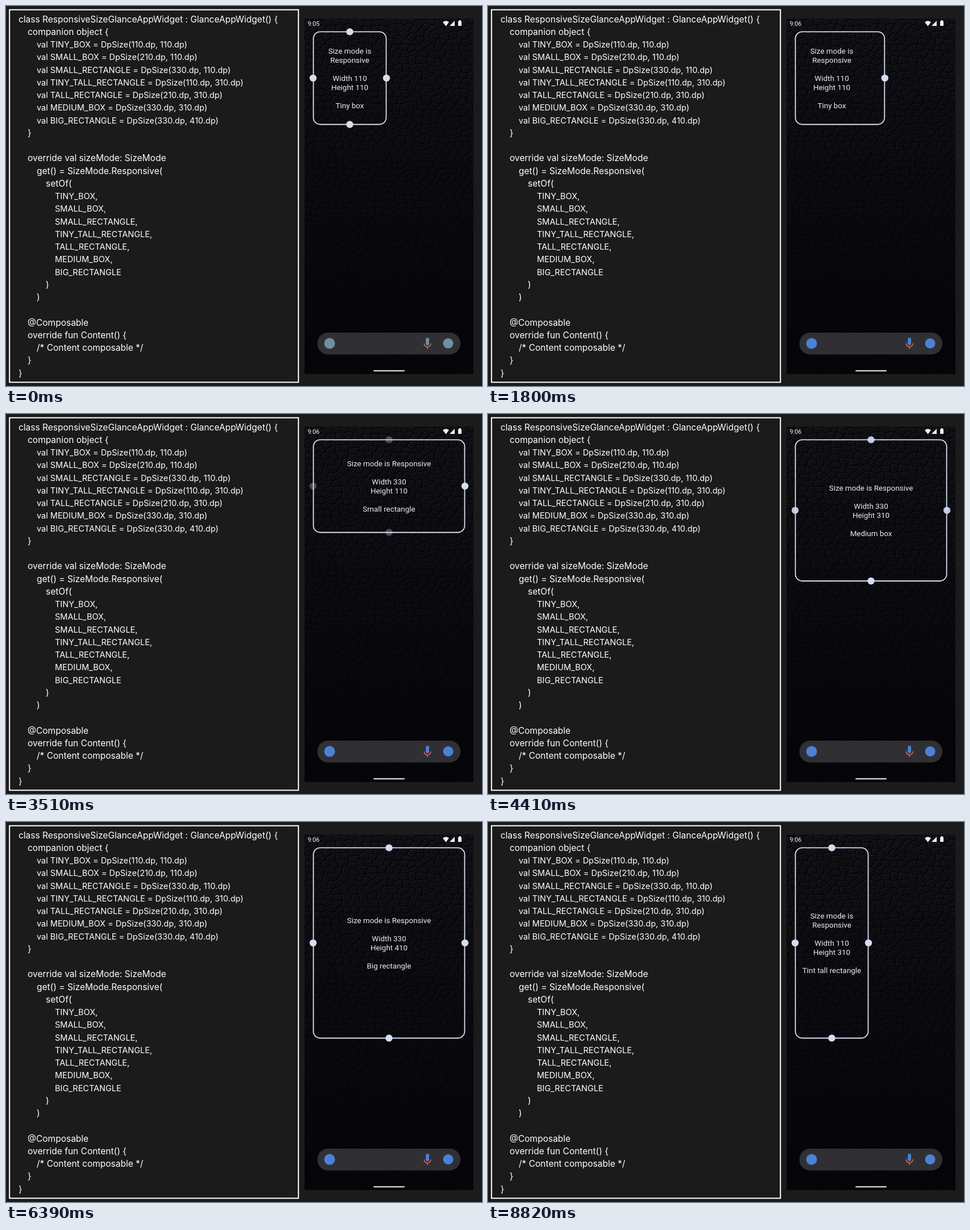
Recreate the animation shown at these times as an HTML page with a canvas. Size 837x669 px, loop 8910 ms.

```html
<!DOCTYPE html>
<html lang="en">
<head>
<meta charset="utf-8">
<title>Responsive widget sizes</title>
<style>
html, body { margin: 0; width: 100%; height: 100%; overflow: hidden; background: #1b1b1b; }
canvas { display: block; }
</style>
</head>
<body>
<canvas id="stage" width="837" height="669"></canvas>
<script>
const W = 837, H = 669, LOOP = 8910, STEP = 90;
const ctx = document.getElementById('stage').getContext('2d');
const phone = { x: 525, y: 22, w: 297, h: 626 };

const code = `class ResponsiveSizeGlanceAppWidget : GlanceAppWidget() {
    companion object {
        val TINY_BOX = DpSize(110.dp, 110.dp)
        val SMALL_BOX = DpSize(210.dp, 110.dp)
        val SMALL_RECTANGLE = DpSize(330.dp, 110.dp)
        val TINY_TALL_RECTANGLE = DpSize(110.dp, 310.dp)
        val TALL_RECTANGLE = DpSize(210.dp, 310.dp)
        val MEDIUM_BOX = DpSize(330.dp, 310.dp)
        val BIG_RECTANGLE = DpSize(330.dp, 410.dp)
    }

    override val sizeMode: SizeMode
        get() = SizeMode.Responsive(
            setOf(
                TINY_BOX,
                SMALL_BOX,
                SMALL_RECTANGLE,
                TINY_TALL_RECTANGLE,
                TALL_RECTANGLE,
                MEDIUM_BOX,
                BIG_RECTANGLE
            )
        )

    @Composable
    override fun Content() {
        /* Content composable */
    }
}`.split('\n');

// Right and bottom edge of the widget with its reported size
const sizes = [
  { r: 669, b: 208.5, w: 110, h: 110, name: 'Tiny box' },
  { r: 738, b: 208.5, w: 210, h: 110, name: 'Small box' },
  { r: 807, b: 208.5, w: 330, h: 110, name: 'Small rectangle' },
  { r: 807, b: 294, w: 330, h: 310, name: 'Medium box' },
  { r: 807, b: 380.5, w: 330, h: 410, name: 'Big rectangle' },
  { r: 738, b: 380.5, w: 210, h: 310, name: 'Tall rectangle' },
  { r: 669, b: 380.5, w: 110, h: 310, name: 'Tint tall rectangle' }
];
// Start and end of each drag to the next size
const drags = [[1440, 2250], [2790, 3510], [3690, 4320], [4770, 5580], [6480, 7380], [7740, 8460]];

const clamp = v => Math.max(0, Math.min(1, v));
const mix = (a, b, p) => a + (b - a) * p;
const smooth = p => p * p * (3 - 2 * p);
const blend = (a, b, p) => `rgb(${a.map((v, i) => Math.round(mix(v, b[i], p)))})`;

function noise(x, y) {
  const n = Math.sin(x * 127.1 + y * 311.7) * 43758.5453;
  return n - Math.floor(n);
}

// Height of the leather: low in the cracks between jittered cells
function relief(x, y) {
  const u = x / 15, v = y / 11.5, row = Math.floor(v);
  let near = 9, next = 9;
  for (let j = row - 1; j <= row + 1; j++) {
    const shift = (j & 1) / 2, col = Math.floor(u - shift);
    for (let i = col - 1; i <= col + 1; i++) {
      const dx = i + shift + 0.15 + 0.7 * noise(i, j) - u;
      const dy = j + 0.15 + 0.7 * noise(i + 57, j + 19) - v;
      const d = Math.hypot(dx, dy);
      if (d < near) { next = near; near = d; } else if (d < next) next = d;
    }
  }
  return smooth(clamp((next - near) / 0.24));
}

function makeLeather() {
  const c = document.createElement('canvas');
  c.width = phone.w;
  c.height = phone.h;
  const g = c.getContext('2d'), img = g.createImageData(c.width, c.height);
  const above = new Float32Array(c.width);
  for (let y = 0, k = 0; y < c.height; y++) {
    const fade = clamp(1 - y / 560), depth = 0.1 + 0.9 * fade;
    let corner = 1;
    for (let x = 0; x < c.width; x++, k += 4) {
      const h = relief(x, y);
      const slope = y ? h - corner : 0;
      corner = above[x];
      above[x] = h;
      const light = 5.5 + 10.5 * fade + depth * (slope * 15 - (1 - h) * 4);
      img.data[k] = light;
      img.data[k + 1] = light - 0.5;
      img.data[k + 2] = light + 3.5;
      img.data[k + 3] = 255;
    }
  }
  g.putImageData(img, 0, 0);
  return c;
}

function box(x, y, w, h, r) {
  ctx.beginPath();
  ctx.roundRect(x, y, w, h, r);
}

function dot(x, y, r, color) {
  ctx.fillStyle = color;
  ctx.beginPath();
  ctx.arc(x, y, r, 0, Math.PI * 2);
  ctx.fill();
}

function shape(points) {
  ctx.beginPath();
  points.forEach(([x, y]) => ctx.lineTo(x, y));
  ctx.fill();
}

function drawCode() {
  ctx.strokeStyle = '#fff';
  ctx.lineWidth = 2;
  ctx.strokeRect(6.2, 6.6, 508, 655.8);
  ctx.fillStyle = '#fff';
  ctx.textAlign = 'left';
  ctx.textBaseline = 'alphabetic';
  code.forEach((line, i) => {
    const text = line.trimStart();
    // Lines with constants are set a little smaller
    const size = /[A-Z]_/.test(text) ? 14.5 : 15.5;
    ctx.font = size + 'px Inter, sans-serif';
    ctx.fillText(text, 22 + (line.length - text.length) * 4, 28.7 + i * 22.25);
  });
}

function drawStatus(t) {
  ctx.fillStyle = '#f2f2f4';
  ctx.font = '10.8px Roboto, sans-serif';
  ctx.textAlign = 'left';
  ctx.textBaseline = 'alphabetic';
  ctx.fillText(t < 1350 ? '9:05' : '9:06', 530.5, 34.5);
  ctx.beginPath();
  ctx.moveTo(773.5, 35.5);
  ctx.lineTo(768, 28.5);
  ctx.quadraticCurveTo(773.5, 24, 779, 28.5);
  ctx.fill();
  shape([[780, 35], [789, 35], [789, 26]]);
  box(795, 26.5, 6, 8.5, 1);
  ctx.fill();
  ctx.fillRect(796.5, 25, 3, 2);
}

function drawSearch(clear) {
  ctx.fillStyle = '#303034';
  box(547.5, 575, 251.5, 38.5, 19);
  ctx.fill();
  const blue = blend([112, 143, 160], [75, 130, 215], clear);
  const red = blend([158, 112, 98], [203, 92, 66], clear);
  dot(569, 594, 9.5, blue);
  dot(777.5, 594, 9, blue);
  ctx.fillStyle = blue;
  box(738.3, 584, 5.6, 13, 2.8);
  ctx.fill();
  ctx.strokeStyle = red;
  ctx.lineWidth = 1.8;
  ctx.beginPath();
  ctx.arc(741.1, 594, 6, 0, Math.PI);
  ctx.moveTo(741.1, 600);
  ctx.lineTo(741.1, 604);
  ctx.stroke();
  ctx.fillStyle = '#f4f4f4';
  box(646, 641.3, 55, 2, 1);
  ctx.fill();
}

function dragSide(i) {
  return sizes[i].r === sizes[i + 1].r ? 'bottom' : 'right';
}

function pose(t) {
  let at = 0;
  while (at < drags.length && t >= drags[at][1]) at++;
  const from = sizes[at];
  if (at === drags.length || t < drags[at][0]) {
    const since = at ? t - drags[at - 1][1] : LOOP;
    return { r: from.r, b: from.b, size: from, side: at ? dragSide(at - 1) : '', rest: clamp(since / 150 + 0.3) };
  }
  const [start, end] = drags[at], to = sizes[at + 1];
  const p = smooth((t - start) / (end - start));
  return {
    r: mix(from.r, to.r, p), b: mix(from.b, to.b, p),
    size: p > 0.66 ? to : from, side: dragSide(at), rest: 0
  };
}

function drawWidget(t, clear) {
  const { r, b, size, side, rest } = pose(t);
  const left = 540, top = 45.4, cx = (left + r) / 2, cy = (top + b) / 2;
  ctx.strokeStyle = blend([220, 222, 230], [218, 224, 243], clear);
  ctx.lineWidth = 1.8;
  box(left + 0.5, top, r - left - 1, b - top, 12);
  ctx.stroke();

  const fill = blend([217, 221, 233], [211, 221, 246], clear);
  const handles = { left: [left, cy], top: [cx, top], right: [r, cy], bottom: [cx, b] };
  for (const [key, [x, y]] of Object.entries(handles)) {
    ctx.globalAlpha = key === side ? 1 : rest;
    dot(x, y, 6.2, fill);
  }
  ctx.globalAlpha = 1;

  const title = size.w === 110 ? ['Size mode is', 'Responsive'] : ['Size mode is Responsive'];
  const lines = [...title, '', 'Width ' + size.w, 'Height ' + size.h, '', size.name];
  const mid = (left + size.r) / 2;
  const first = (top + size.b) / 2 - (lines.length - 1) * 8 + 4.8;
  ctx.fillStyle = '#ececf0';
  ctx.font = '13.4px Roboto, sans-serif';
  ctx.textAlign = 'center';
  ctx.textBaseline = 'alphabetic';
  lines.forEach((line, i) => ctx.fillText(line, mid, first + i * 16));
}

const leather = makeLeather();

function draw(now) {
  const t = Math.floor(now % LOOP / STEP) * STEP;
  const clear = clamp(t / 900);
  ctx.fillStyle = '#1b1b1b';
  ctx.fillRect(0, 0, W, H);
  drawCode();
  ctx.drawImage(leather, phone.x, phone.y);
  drawStatus(t);
  drawSearch(clear);
  drawWidget(t, clear);
}

let begin;
function tick(now) {
  begin ??= now;
  draw(now - begin);
  requestAnimationFrame(tick);
}
requestAnimationFrame(tick);
</script>
</body>
</html>
```
